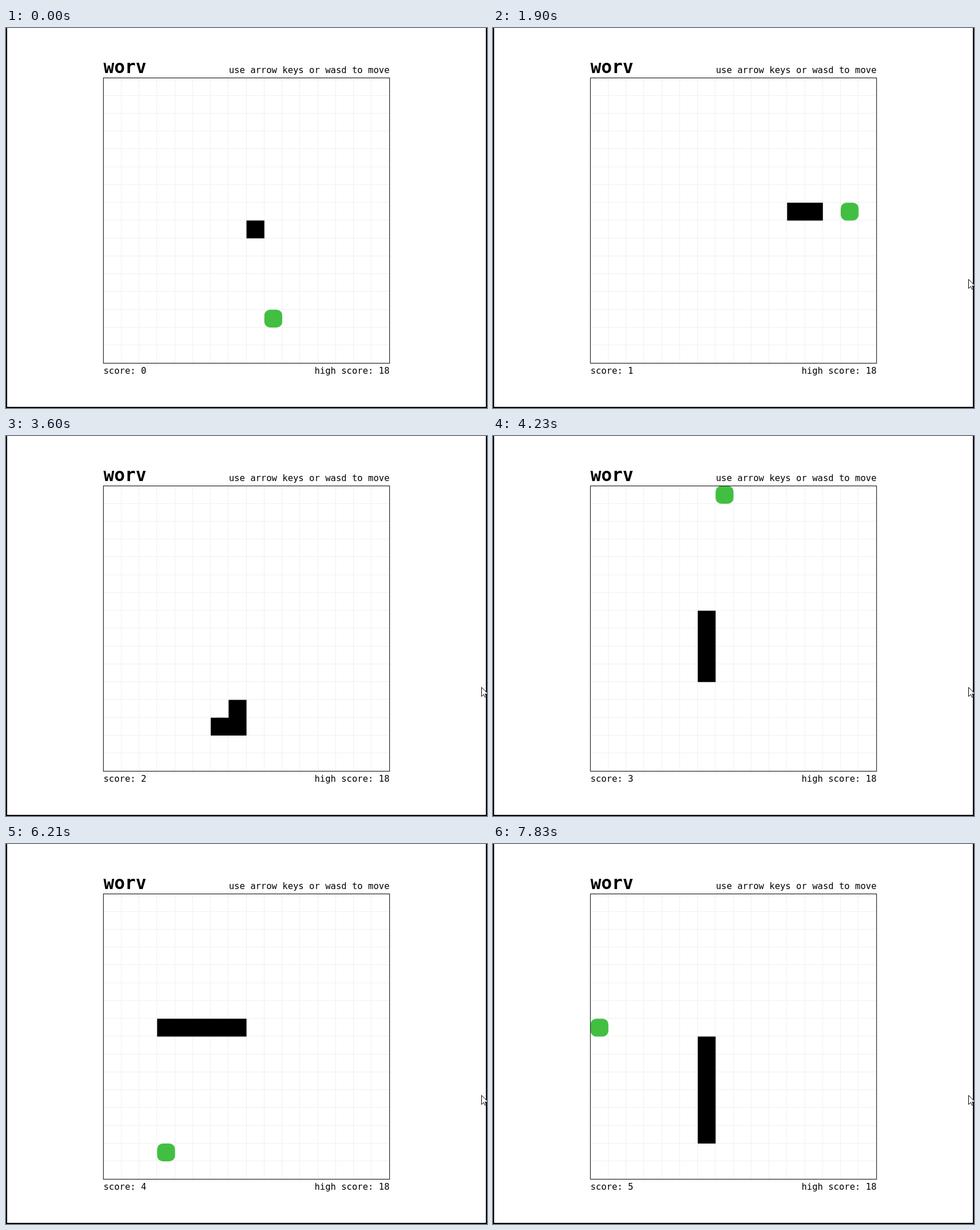
Write an HTML page that moves like this. It is 841 by 666 pixels and loops after 8000 ms.

```html
<!DOCTYPE html>
<html lang="en">
<head>
<meta charset="utf-8">
<title>worv</title>
<style>
  html, body { margin: 0; width: 100%; height: 100%; overflow: hidden; background: #fff; }
  svg { display: block; }
  text { font: 15.55px "DejaVu Sans Mono", "Noto Sans Mono", monospace; }
  .title { font-size: 31.1px; font-weight: bold; }
  .end { text-anchor: end; }
  #grid { stroke: #f0f0f0; }
  #snake { fill: none; stroke: #000; stroke-width: 31.25; stroke-linecap: square; }
  #food { fill: #42bf41; }
  #board { fill: none; stroke: #000; }
  #cursor { fill: #fff; stroke: #000; }
</style>
</head>
<body>
<svg width="841" height="666" viewBox="0 0 841 666">
  <path d="M0 0h2v664h837V0h2v666H0z"/>
  <text class="title" x="170.5" y="79">worv</text>
  <text class="end" x="670.5" y="79">use arrow keys or wasd to move</text>
  <text id="score" x="170.5" y="606">score: 0</text>
  <text class="end" x="670.5" y="606">high score: 18</text>
  <path id="grid"/>
  <rect id="food" width="31.25" height="31.25" rx="10"/>
  <path id="snake"/>
  <rect id="board" x="170.3" y="87.5" width="500.4" height="500"/>
  <path id="cursor" d="M831.5 440.5v16l3.7-3.5 2.4 5 2.4-1-2.3-4.9h5.3z"/>
</svg>
<script>
const LOOP = 8000, START = 454, TICK = 89.85;
const CELL = 31.25, LEFT = 170.5, TOP = 87.4;
const $ = id => document.getElementById(id);

// Each leg is a direction and a number of cells
const route = 'D5 R2 U6 R4 D1 L7 D5 L1 U13 R1 D7 L4 D7 R3 U6';
const dirs = { U: [0, -1], D: [0, 1], L: [-1, 0], R: [1, 0] };
const path = [[8, 8]];
for (const leg of route.split(' ')) {
  const [dx, dy] = dirs[leg[0]];
  for (let n = +leg.slice(1); n > 0; n--) {
    const [x, y] = path[path.length - 1];
    path.push([x + dx, y + dy]);
  }
}

const foods = [[9, 13], [14, 7], [6, 13], [7, 0], [3, 14], [0, 7]];
const meals = foods.map(([fx, fy]) => path.findIndex(([x, y]) => x === fx && y === fy));

let lines = '';
for (let k = 1; k < 16; k++) {
  const x = Math.floor(170 + k * CELL) + 0.5;
  const y = Math.floor(86.9 + k * CELL) + 0.5;
  lines += `M${x} 88v499M171 ${y}h499`;
}
$('grid').setAttribute('d', lines);

const center = ([x, y]) => `${LEFT + (x + 0.5) * CELL} ${TOP + (y + 0.5) * CELL}`;

// One cell per tick, resting on every seventh
function stepAt(t) {
  const ticks = Math.max(0, Math.floor((t - START) / TICK) + 1);
  return ticks - Math.floor(ticks / 7);
}

function draw(now) {
  const t = now % LOOP;
  const step = stepAt(t);
  const score = meals.filter(at => at >= 0 && at < step).length;
  const body = path.slice(step - score, step + 1).map(center);
  const [fx, fy] = foods[score];
  // The first point is doubled so that a single cell still gets its caps
  $('snake').setAttribute('d', `M${body[0]}L${body.join('L')}`);
  $('food').setAttribute('x', LEFT + fx * CELL);
  $('food').setAttribute('y', TOP + fy * CELL);
  $('score').textContent = `score: ${score}`;
  $('cursor').style.display = t < 280 ? 'none' : '';
  requestAnimationFrame(draw);
}
draw(0);
</script>
</body>
</html>
```
